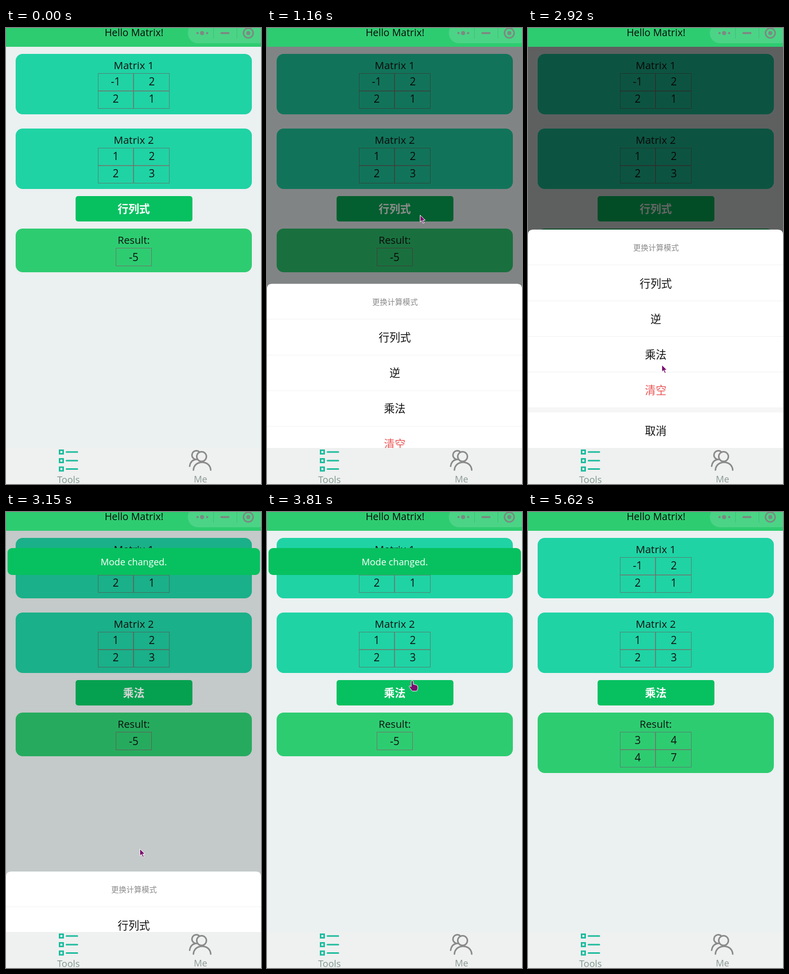
Write an HTML page that moves like this. It is 502x898 px and loops after 6480 ms.

```html
<!DOCTYPE html>
<html lang="zh">
<head>
<meta charset="utf-8">
<title>Hello Matrix!</title>
<style>
html, body { margin: 0; height: 100%; overflow: hidden; }
svg { display: block; width: 502px; height: 898px; }
text { font-family: "Open Sans", "Noto Sans CJK SC", "Noto Sans CJK", sans-serif; text-anchor: middle; }
.line { fill: none; stroke-width: 3; stroke-linecap: round; }
</style>
</head>
<body>
<svg id="stage" viewBox="0 0 502 898"></svg>
<script>
const LOOP = 6480;
const rect = (x, y, w, h, fill, r = 0, id = '') =>
  `<rect id="${id}" x="${x}" y="${y}" width="${w}" height="${h}" rx="${r}" fill="${fill}"/>`;
const text = (s, x, y, size, fill = '#111', more = '') =>
  `<text x="${x}" y="${y}" dy=".36em" font-size="${size}" fill="${fill}" ${more}>${s}</text>`;

// Table of two by two cells with its top left corner at 181, y
const table = (y, cells) =>
  `<rect x="181.5" y="${y + .5}" width="140" height="69" fill="none" stroke="#557f72"/>
   <path d="M251 ${y}v70M181 ${y + 35}h141" stroke="#75706b" stroke-width="1.6"/>` +
  cells.map((c, i) => text(c, i % 2 ? 287 : 216, y + (i < 2 ? 16 : 50), 21)).join('');

const card = (y, title, cells) =>
  rect(19, y, 465, 119, '#1fd3a4', 14) + text(title, 251.5, y + 23, 20.6) + table(y + 38, cells);

const options = [['行列式', 503], ['逆', 573], ['乘法', 643], ['清空', 713, '#ea5454'], ['取消', 793]];
const sheet =
  '<path d="M0 827V407Q0 397 10 397H492Q502 397 502 407V827Z" fill="#fff"/>' +
  rect(0, 608, 502, 69, '#ececec', 0, 'row') +
  '<path d="M0 466.5H502M0 537.5H502M0 607.5H502M0 677.5H502" stroke="#f1f1f1"/>' +
  rect(0, 747, 502, 10, '#f6f6f6') +
  text('更换计算模式', 252, 433, 15, '#8a8a8a') +
  options.map(([s, y, fill]) => text(s, 251.5, y, 21.2, fill)).join('');

const capsule =
  rect(358, -10, 160, 40, '#4bd486', 20) +
  `<g fill="#7c8a82"><circle cx="377" cy="10" r="2.3"/><circle cx="386" cy="10" r="4"/>
   <circle cx="396" cy="10" r="2.3"/><rect x="422" y="8" width="18" height="4" rx="2"/>
   <circle cx="477" cy="10" r="4"/></g>
   <circle cx="477" cy="10" r="9.5" class="line" stroke="#7c8a82"/>
   <path d="M408.500 0V21M454.500 0V21" stroke="#3fbf77"/>`;

const listIcon = [835, 852, 868.5].map(y =>
  `<path class="line" stroke="#1abc9c" d="M105.500 ${y - 3.5}h7v7h-7zM119 ${y}h21.500"/>`).join('');
const peopleIcon =
  `<g class="line" stroke="#8a8a8a"><circle cx="385" cy="844" r="9.5"/>
   <path d="M369 870.500C370 850 402 850 403 870.500M376 849.500A8.500 8.500 0 1 1 381 835.500M361.500 863Q363 852 372 850"/></g>`;

document.getElementById('stage').innerHTML =
  rect(0, 0, 502, 898, '#ebf0f1') +
  card(51, 'Matrix 1', [-1, 2, 2, 1]) +
  card(198, 'Matrix 2', [1, 2, 2, 3]) +
  rect(137, 331, 230, 50, '#07c160', 5, 'button') +
  text('', 251.5, 356, 21.2, '#fff', 'id="mode" font-weight="700"') +
  rect(19, 395, 465, 86, '#2ecc71', 14, 'panel') +
  text('Result:', 251.5, 418, 20.2) +
  `<g id="number"><rect x="216.500" y="433.500" width="70" height="35" fill="none" stroke="#75706b"/>${text(-5, 251.5, 451, 21)}</g>
   <g id="product">${table(433, [3, 4, 4, 7])}</g>` +
  rect(0, 37, 502, 790, '#000', 0, 'mask') +
  `<g id="sheet">${sheet}</g>` +
  rect(0, 827, 502, 71, '#eff0f0') + listIcon + peopleIcon +
  text('Tools', 123, 889, 18.4, '#7f998d') + text('Me', 383, 889, 18, '#8b9a93') +
  rect(0, 0, 502, 37, '#2ecc71') + text('Hello Matrix!', 252, 9, 19.5, '#0a0a0a') + capsule +
  `<g id="toast">${rect(3, 71, 497, 53, '#07c160', 9)}${text('Mode changed.', 251.5, 98, 18.2, '#fff')}</g>
   <g id="cursor" fill="#7a0f6e" stroke="#fff">
   <path id="arrow" d="M.5 .5V14l3.200-2.800 2.500 5.500 2.300-1-2.400-5.200h4.400Z"/>
   <path id="hand" d="M-2 2a2 2 0 0 1 4 0v5l6 1.500q3 .8 3 4v3l-2 5h-9l-5-7q-2-3 0-3.500l3 2z"/></g>
   <circle id="tap" r="15" fill="#ff0" fill-opacity=".5"/>`;

const el = {};
document.querySelectorAll('[id]').forEach(n => { if (n.id) el[n.id] = n; });
const show = (name, on) => el[name].setAttribute('visibility', on ? 'visible' : 'hidden');
const clamp = v => Math.max(0, Math.min(1, v));
const bezier = (a, b, s) => 3 * a * s * (1 - s) ** 2 + 3 * b * s * s * (1 - s) + s ** 3;

// CSS "ease"
function ease(x) {
  x = clamp(x);
  let lo = 0, hi = 1;
  for (let i = 0; i < 20; i++) {
    const mid = (lo + hi) / 2;
    if (bezier(.25, .25, mid) < x) lo = mid; else hi = mid;
  }
  return bezier(.1, 1, lo);
}

// Pointer stops: time, x, y
const stops = [
  [60, 411, 831], [420, 301, 368], [1490, 301, 368], [1670, 263, 591],
  [2050, 263, 591], [2100, 263, 541], [2280, 263, 541], [2410, 252, 691],
  [2590, 252, 691], [2650, 263, 663], [3300, 263, 663], [3530, 284, 414],
  [3590, 284, 414], [3800, 286, 332], [3990, 271, 345], [5060, 271, 345], [5600, 330, 900]
];
function pointer(t) {
  const i = Math.max(1, stops.findIndex(s => s[0] > t));
  const [a, b] = [stops[i - 1], stops[i]];
  const k = clamp((t - a[0]) / (b[0] - a[0])), s = k * k * (3 - 2 * k);
  return [a[1] + (b[1] - a[1]) * s, a[2] + (b[2] - a[2]) * s];
}

function draw(t) {
  const during = (a, b) => t >= a && t < b;
  const open = ease((t - 1025) / 300) - ease((t - 3022) / 300);
  const pressed = during(650, 1490) || during(4320, 4400);
  const multiplied = t >= 4360;

  el.button.setAttribute('fill', pressed ? '#06ad56' : '#07c160');
  el.mode.textContent = t < 3022 ? '行列式' : '乘法';
  el.panel.setAttribute('height', multiplied ? 119 : 86);
  show('number', !multiplied);
  show('product', multiplied);

  el.mask.setAttribute('opacity', .6 * open);
  el.sheet.setAttribute('transform', `translate(0 ${430 * (1 - open)})`);
  show('sheet', open > 0);
  show('row', during(2970, 3022));
  show('toast', during(3022, 5060));

  const seen = during(60, 5600);
  const [x, y] = seen ? pointer(t) : [0, 0];
  const hover = x > 137 && x < 367 && y > 331 && y < 381 && !during(1110, 3322);
  el.cursor.setAttribute('transform', `translate(${x} ${y})`);
  show('arrow', seen && !hover);
  show('hand', seen && hover);
  el.tap.setAttribute('cx', x);
  el.tap.setAttribute('cy', y);
  show('tap', during(650, 1110) || during(2970, 3022) || during(4320, 4400));
}

const start = performance.now();
function tick() {
  draw((performance.now() - start) % LOOP);
  requestAnimationFrame(tick);
}
tick();
</script>
</body>
</html>
```
